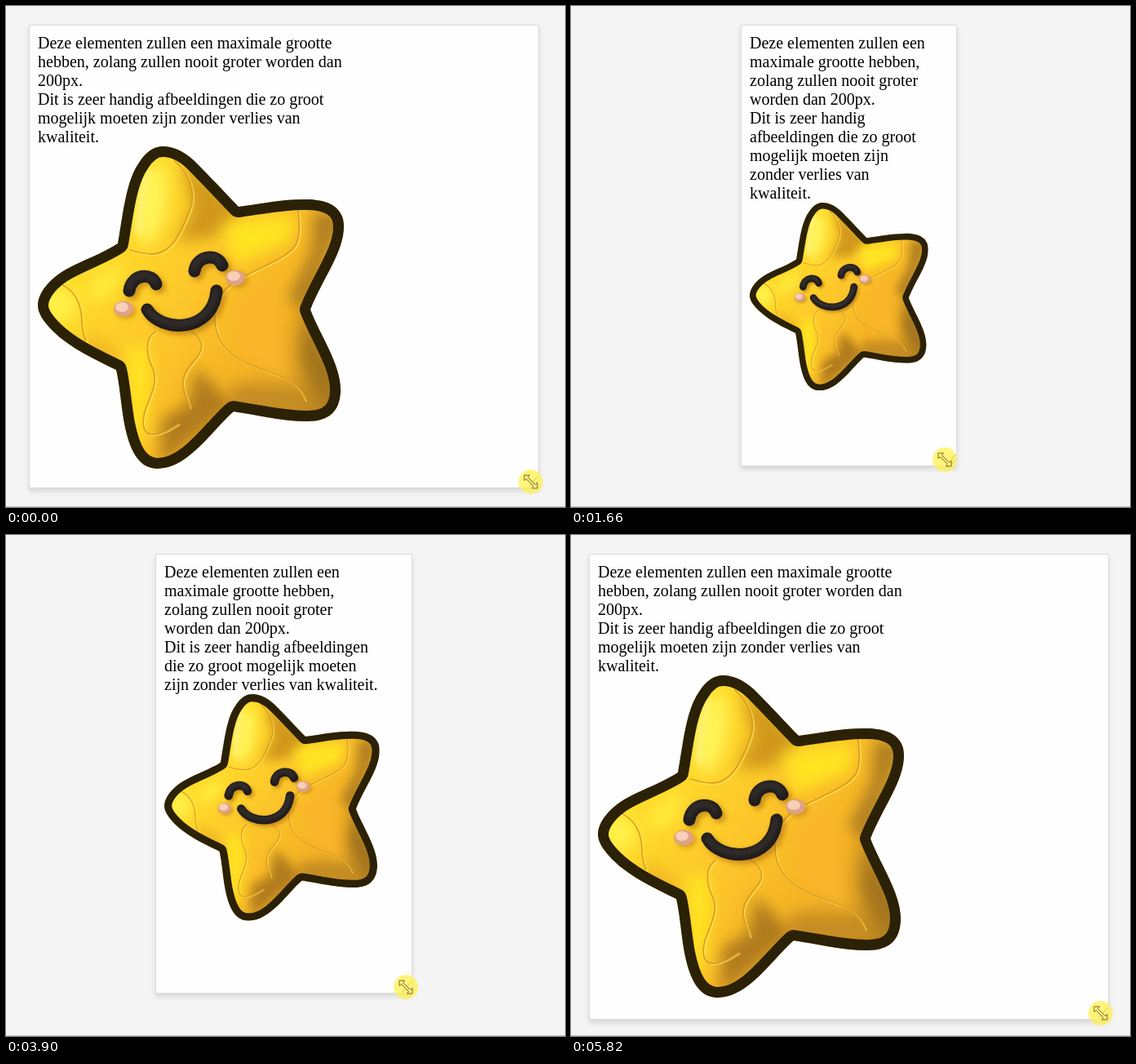
An HTML page for the animation above (6150 ms loop, 685x614 px).

```html
<!DOCTYPE html>
<html lang="nl">
<head>
<meta charset="utf-8">
<title>Maximale grootte</title>
<style>
  html, body { margin: 0; width: 100%; height: 100%; overflow: hidden; background: #f4f4f4; }
  #stage { position: relative; width: 685px; height: 614px; overflow: hidden; background: #f4f4f4; }
  #floor { position: absolute; left: 0; top: 613px; width: 685px; height: 1px; background: #c6c6c6; }
  #box {
    position: absolute; top: 23px; box-sizing: border-box; padding: 10px; overflow: hidden;
    background: #fefefe; border: 1px solid #dcdcdc; box-shadow: 0 4px 6px rgba(0, 0, 0, .12);
  }
  #content { width: 90%; max-width: 375px; }
  p { margin: 0; font: 20px/23px "Liberation Serif", "Times New Roman", serif; color: #000; }
  #star { display: block; width: 100%; height: auto; }
  #thumb { position: absolute; top: 0; right: 2px; width: 4px; background: #c9c9c9; }
  #grip { position: absolute; right: 0; bottom: 0; }
  #cursor { position: absolute; left: 0; top: 0; margin: -15px 0 0 -15px; }
</style>
</head>
<body>
<div id="stage">
  <div id="floor"></div>
  <div id="box">
    <div id="content">
      <p>Deze elementen zullen een maximale grootte hebben, zolang zullen nooit groter worden dan 200px.<br>Dit is zeer handig afbeeldingen die zo groot mogelijk moeten zijn zonder verlies van kwaliteit.</p>
      <svg id="star" viewBox="0 0 375 395">
        <defs>
          <path id="shape" d="M98,119 C104,85 108,42 124,20 C134,4 145,0 153,0 C168,0 183,8 196,22 C215,41 232,60 246,74 C275,70 300,65 325,65 C355,64 375,74 375,98 C375,130 350,160 334,200 C346,232 372,268 371,300 C370,324 358,337 330,337 C298,337 268,329 240,325 C215,346 185,395 147,395 C122,395 112,370 106,340 C102,318 100,290 96,274 C72,262 40,248 18,226 C6,214 0,204 0,195 C0,180 14,162 36,150 C56,139 80,131 98,119Z"/>
          <clipPath id="inside"><use href="#shape"/></clipPath>
          <linearGradient id="gold" gradientUnits="userSpaceOnUse" x1="60" y1="110" x2="350" y2="310">
            <stop offset="0" stop-color="#ffdf28"/>
            <stop offset=".4" stop-color="#fdc72b"/>
            <stop offset=".72" stop-color="#f5b224"/>
            <stop offset="1" stop-color="#b98520"/>
          </linearGradient>
          <filter id="soft" x="-50%" y="-50%" width="200%" height="200%"><feGaussianBlur stdDeviation="9"/></filter>
          <filter id="haze" x="-50%" y="-50%" width="200%" height="200%"><feGaussianBlur stdDeviation="3"/></filter>
          <g id="seams" fill="none" stroke-linecap="round">
            <path d="M168,18 C186,34 194,56 187,76 C176,106 164,131 141,132 C132,132 122,130 113,127"/>
            <path d="M26,168 C46,176 53,194 54,212 C54,222 55,230 59,238"/>
            <path d="M319,78 C320,92 322,106 317,119 C306,140 262,150 236,170 C218,184 212,212 222,234 C236,264 274,272 300,283 C314,290 322,298 327,311"/>
            <path d="M144,227 C132,234 132,254 140,270 C148,286 140,302 132,322 C126,342 130,354 142,353 C154,352 164,345 172,340"/>
            <path d="M178,226 C194,226 206,240 198,254 C190,266 178,276 178,290 C178,302 184,310 186,320"/>
          </g>
          <g id="face" fill="none" stroke-linecap="round">
            <path d="M112,177 C115,156 140,154 145,169"/>
            <path d="M192,153 C194,134 220,130 226,146"/>
            <path d="M134,200 C150,228 214,230 219,177"/>
          </g>
        </defs>
        <g clip-path="url(#inside)">
          <use href="#shape" fill="url(#gold)"/>
          <g filter="url(#soft)">
            <path d="M174,14 L250,78 L214,112 L170,116 L190,74Z" fill="#c98f18" opacity=".85"/>
            <ellipse cx="140" cy="72" rx="17" ry="50" fill="#fff458" transform="rotate(10 140 72)"/>
            <path d="M228,94 L314,84 L308,118 L240,144Z" fill="#ffe420"/>
            <path d="M338,78 L375,84 L330,200 L306,188 L336,128Z" fill="#ae7e20"/>
            <path d="M326,170 L330,210 L372,290 L350,326 L322,260Z" fill="#a3751c"/>
            <path d="M238,190 L288,160 L296,230 L312,290 L256,262Z" fill="#fbb62a"/>
            <path d="M236,290 L344,302 L340,330 L240,326Z" fill="#c48c20"/>
            <path d="M194,270 L240,318 L150,392 L152,334 L184,316Z" fill="#b17c1e"/>
            <path d="M108,246 L136,244 L140,290 L128,372 L112,350Z" fill="#ffe324"/>
            <ellipse cx="26" cy="194" rx="22" ry="22" fill="#fff048"/>
            <path d="M62,170 L104,140 L96,176 L64,194Z" fill="#ffec3c"/>
            <path d="M62,226 L104,256 L100,278 L56,252Z" fill="#f0b824"/>
          </g>
          <path d="M136,32 C126,54 124,80 124,104" fill="none" stroke="#fffb94" stroke-width="9" stroke-linecap="round" opacity=".55" filter="url(#haze)"/>
          <use href="#seams" stroke="#ffea70" stroke-width="2" opacity=".6" transform="translate(1.6 1.2)"/>
          <use href="#seams" stroke="#d9981a" stroke-width="1.8" opacity=".85"/>
          <use href="#shape" fill="none" stroke="#2b2106" stroke-width="26" stroke-linejoin="round"/>
        </g>
        <use href="#face" stroke="#a9690c" stroke-width="15" opacity=".6" transform="translate(4 4)" filter="url(#haze)"/>
        <use href="#face" stroke="#211d1b" stroke-width="15"/>
        <use href="#face" stroke="#5b5552" stroke-width="3" opacity=".75" transform="translate(-1 -2)" filter="url(#haze)"/>
        <g id="cheeks"></g>
      </svg>
    </div>
    <div id="thumb"></div>
    <svg id="grip" width="14" height="18" fill="none" stroke="#8f8f98" stroke-width="1.2">
      <path d="M3,17 L13,5 M8,17 L13,11"/>
    </svg>
  </div>
  <svg id="cursor" width="30" height="30" viewBox="-15 -15 30 30">
    <circle r="15" fill="#fff250" fill-opacity=".74"/>
    <path d="M-8,-8 L-1.5,-8 L-3.5,-5.5 L5.5,3.5 L8,1.5 L8,8 L1.5,8 L3.5,5.5 L-5.5,-3.5 L-8,-1.5Z" fill="#fff48c" stroke="#846316"/>
  </svg>
</div>
<script>
const $ = id => document.getElementById(id);
const LOOP = 6150, TOP = 23, MIRROR = 681;

// bursts of evenly spaced steps: first, last, count
const bursts = [
  [460, 1030, 9], [1100, 1660, 9], [1730, 2330, 9], [2470, 3020, 9], [3090, 3690, 10],
  [3760, 4310, 9], [4380, 4950, 9], [5020, 5620, 10], [5690, 5820, 3]
];

// time, box left, box bottom, pointer distance from the right edge
const keys = [
  [0, 28, 591, 10], [390, 28, 591, 10], [600, 52, 596, 16], [816, 93, 594, 20],
  [1030, 138, 587, 20], [1660, 208, 564, 15], [2330, 258, 550, 14], [2620, 268, 546, 10],
  [2800, 267, 546, 8], [3020, 259, 548, 8], [3090, 253, 549, 8], [3690, 202, 559, 4],
  [3898, 183, 562, 8], [4310, 138, 569, 5], [4950, 74, 585, 10], [5020, 71, 587, 6],
  [5620, 28, 591, 10], [5820, 22, 594, 10]
];

$("cheeks").innerHTML = [[105, 199], [242, 161]].map(([x, y]) =>
  `<g transform="translate(${x} ${y})">
    <ellipse cx="3" cy="3" rx="12" ry="9" fill="#a8690f" opacity=".55" filter="url(#haze)"/>
    <ellipse rx="12" ry="9.5" fill="#dfa287"/>
    <ellipse cx="-2" cy="-2" rx="8" ry="6" fill="#f6cfb6"/>
  </g>`).join("");

function snap(t) {
  let at = 0;
  for (const [first, last, count] of bursts) {
    if (t < first) break;
    const gap = (last - first) / (count - 1);
    at = first + gap * Math.min(count - 1, Math.floor((t - first) / gap + .001));
  }
  return at;
}

function pose(t) {
  const i = keys.findIndex(k => k[0] > t);
  if (i < 0) return keys[keys.length - 1].slice(1);
  const a = keys[i - 1], b = keys[i], f = (t - a[0]) / (b[0] - a[0]);
  return [1, 2, 3].map(n => Math.round(a[n] + (b[n] - a[n]) * f));
}

let shown = -1;
function draw(t) {
  const at = snap(t);
  if (at === shown) return;
  shown = at;
  const [left, bottom, lag] = pose(at);
  const right = MIRROR - left, height = bottom - TOP;
  const box = $("box").style;
  box.left = left + "px";
  box.width = right - left + "px";
  box.height = height + "px";
  $("cursor").style.transform = `translate(${right - lag}px, ${bottom - 8}px)`;

  const view = height - 2, full = $("content").offsetHeight + 20;
  $("thumb").style.height = (full > view ? view * view / full : 0) + "px";
}

const start = performance.now();
function tick() {
  draw((performance.now() - start) % LOOP);
  requestAnimationFrame(tick);
}
tick();
</script>
</body>
</html>
```
